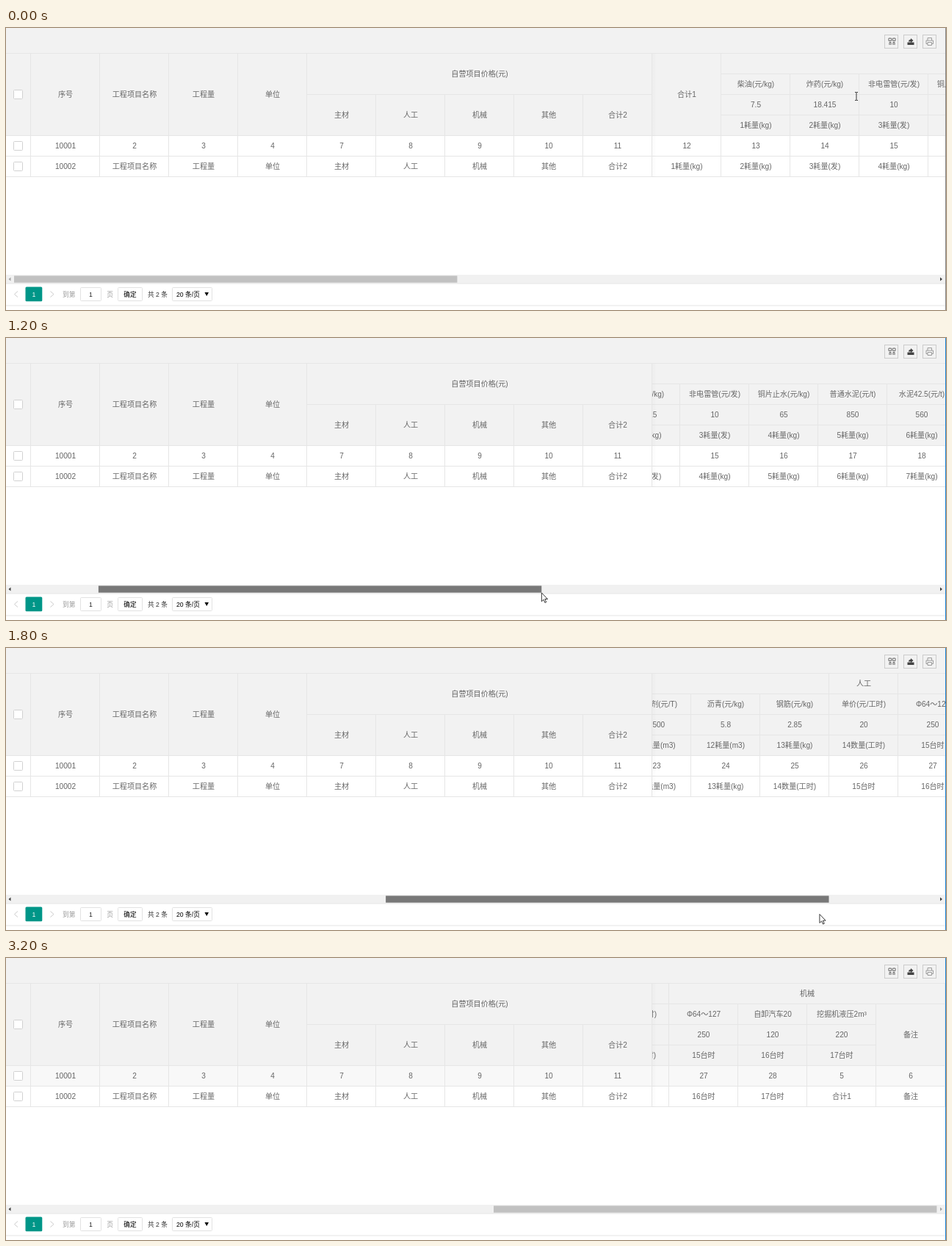
Animation, 1280 px wide and 384 px high, one loop 3500 ms. Source, as an HTML page:

```html
<!DOCTYPE html>
<html lang="zh-CN">
<head>
<meta charset="utf-8">
<style>
  html, body { margin: 0; width: 100%; height: 100%; overflow: hidden; background: #fff; }
  svg { display: block; width: 1280px; height: 384px; }
  text { font-family: "Liberation Sans", "Noto Sans CJK SC", "Noto Sans CJK", sans-serif; }
</style>
</head>
<body>
<svg id="stage" viewBox="0 0 1280 384">
  <defs>
    <clipPath id="view"><rect x="880" y="34" width="399" height="170"/></clipPath>
    <linearGradient id="shade">
      <stop offset="0" stop-opacity=".02"/>
      <stop offset="1" stop-opacity="0"/>
    </linearGradient>
  </defs>
</svg>
<script>
const LOOP = 3500, STEP = 100;
const PRESS = 700, RELEASE = 2500;
const COL = 94, ROW = 28, HEAD_TOP = 35, FIXED = 880;
const MAX_SCROLL = 1387, SCROLL_RATIO = 2.124, THUMB_LEFT = 11;
const LINE = '#e6e6e6', GREY = '#f2f2f2', INK = '#666';

const stage = document.getElementById('stage');
const rowY = r => HEAD_TOP + r * ROW;   // 0-3 header, 4-5 body
const colX = i => FIXED + i * COL;

function add(parent, tag, attrs, content) {
  const node = document.createElementNS('http://www.w3.org/2000/svg', tag);
  for (const key in attrs) node.setAttribute(key, attrs[key]);
  if (content !== undefined) node.textContent = content;
  parent.appendChild(node);
  return node;
}
const box = (parent, x, y, width, height, fill, more) =>
  add(parent, 'rect', { x, y, width, height, fill, ...more });
const frame = (x, y, w, h, stroke) =>
  box(stage, x + .5, y + .5, w - 1, h - 1, '#fff', { stroke, rx: 1 });
const path = (d, stroke, more) =>
  add(stage, 'path', { d, stroke, fill: 'none', ...more });
const label = (parent, x, y, content, fill = INK, size = 10.1, anchor = 'middle') =>
  add(parent, 'text', { x, y: y + size * .37, fill, 'font-size': size, 'text-anchor': anchor }, content);

// Cell over the rows from..to with a right and a bottom border
function cell(parent, x, from, to, w, content = '') {
  const top = rowY(from), bottom = rowY(to);
  box(parent, x + w - 1, top, 1, bottom - top, LINE);
  box(parent, x, bottom - 1, w, 1, LINE);
  if (content !== '') label(parent, x + w / 2, (top + bottom) / 2 - .5, content);
}
function bodyCells(parent, x, w, first, second) {
  cell(parent, x, 4, 5, w, first);
  cell(parent, x, 5, 6, w, second);
}

// Backgrounds
box(stage, 0, 0, 1280, 384, '#fff');
box(stage, 0, 0, 1280, rowY(4), GREY);
box(stage, 0, HEAD_TOP - 1, 1280, 1, LINE);
const hoverRow = box(stage, 0, rowY(4), 1280, ROW - 1, '#f8f8f8');

// Scrolling columns
const names = ('合计1,柴油(元/kg),炸药(元/kg),非电雷管(元/发),铜片止水(元/kg),普通水泥(元/t),水泥42.5(元/t),' +
  '粉煤灰(元/kg),砂(元/m3),石(元/m3),块石(元/m3),减水剂(元/T),沥青(元/kg),钢筋(元/kg),单价(元/工时),' +
  'Φ64～127,自卸汽车20,挖掘机液压2m³,备注').split(',');
const prices = ',7.5,18.415,10,65,850,560,0.48,66,50,60,2500,5.8,2.85,20,250,120,220'.split(',');

function usage(i) {
  if (i === 18) return '合计1';
  if (i > 14) return i + '台时';
  if (i === 14) return i + '数量(工时)';
  return `${i}耗量(${i === 3 ? '发' : i > 7 && i < 13 ? 'm3' : 'kg'})`;
}

const view = add(stage, 'g', { 'clip-path': 'url(#view)' });
const table = add(view, 'g', {});
const last = names.length - 1;
names.forEach((name, i) => {
  const x = colX(i);
  if (i === 0) cell(table, x, 0, 4, COL, name);
  else if (i === last) cell(table, x, 1, 4, COL, name);
  else [name, prices[i], usage(i)].forEach((v, r) => cell(table, x, r + 1, r + 2, COL, v));
  bodyCells(table, x, COL, i < 17 ? 12 + i : i - 12, i === last ? name : usage(i + 1));
});
cell(table, colX(1), 0, 1, 13 * COL, '主材价格及参考消耗量');
cell(table, colX(14), 0, 1, COL, '人工');
cell(table, colX(15), 0, 1, 4 * COL, '机械');
box(view, FIXED, HEAD_TOP, 6, 6 * ROW, 'url(#shade)');

// Fixed columns
cell(stage, 0, 0, 4, 34);
bodyCells(stage, 0, 34);
[84, 154, 182].forEach(y => frame(10, y, 13, 13, '#d2d2d2'));
['序号', '工程项目名称', '工程量', '单位', '主材', '人工', '机械', '其他', '合计2'].forEach((name, i) => {
  const x = 34 + i * COL;
  cell(stage, x, i < 4 ? 0 : 2, 4, COL, name);
  bodyCells(stage, x, COL, i ? i + (i < 4 ? 1 : 3) : 10001, i ? name : 10002);
});
cell(stage, 410, 0, 2, 5 * COL, '自营项目价格(元)');

// Toolbar
for (let x = 1196.5; x < 1260; x += 26) box(stage, x, 9.5, 18, 18, 'none', { stroke: '#ccc' });
path('M1202 14h3.5v3.5h-3.5zM1207.5 14h3.5v3.5h-3.5zM1203 23v-3.5h2v3.5M1208 23v-3.5h2v3.5', '#666');
path('M1227.5 19.500h9v3.500h-9zM1229 18.500q0-2.500 3-3v-1.500l3.500 3-3.500 3v-1.500z', 'none', { fill: '#444' });
path('M1255 17v-3.500h5.500v3.500M1255 21.500h-2v-4.500h9.500v4.500h-2M1255 19.500h5.500v4h-5.500z', '#888', { 'stroke-width': .8 });

// Scrollbar
box(stage, 0, 336, 1279, 12, '#f1f1f1');
const thumb = box(stage, THUMB_LEFT, 337.4, 603.4, 9.3, '#c1c1c1');
const leftArrow = path('M6.5 339.5v5l-3-2.5z', 'none');
const rightArrow = path('M1272 339.5v5l3-2.5z', 'none');

// Pager
box(stage, 0, 347.5, 1279, 1, LINE);
box(stage, 0, 377.5, 1279, 1, LINE);
path('M16 358.5l-4.5 4 4.5 4M60.5 358.5l4.5 4-4.5 4', '#ccc');
box(stage, 26.5, 352.6, 22.8, 19.6, '#009688', { rx: 1.5 });
[[101, 29], [152, 34], [226, 55]].forEach(([x, w]) => frame(x, 353, w, 19, '#e2e2e2'));
const small = (x, s, fill, anchor) => label(stage, x, 362.5, s, fill, 8.7, anchor);
small(38, '1', '#fff');
small(77, '到第', '#999', 'start');
small(115.5, '1', '#222');
small(141.5, '页', '#999');
small(169, '确定', '#000');
small(206.5, '共 2 条', '#333');
small(232, '20 条/页', '#000', 'start');
path('M270.5 360h5.5l-2.75 5z', 'none', { fill: '#000' });

const windowEdge = box(stage, 1279, 0, 1, 384, '#8a8a8a');

// Pointers
const arrow = path('M.5 .5V12.4L3.2 9.9 5.1 14 6.9 13.2 5 9.1H8.7Z', '#222', { fill: '#fff', 'stroke-width': .9 });
const beam = path('M-2-5.5h1.5l.5.5.5-.5h1.5M0-5v10M-2 5.500h1.500l.5-.5.5.5h1.500', '#333');

// Key points: time, then values
const scrollKeys = [
  [PRESS, 0], [800, 17], [900, 78], [1200, 244], [1400, 509], [1600, 918],
  [1800, 1075], [2200, 1336], [2250, MAX_SCROLL]
];
const leaveKeys = [[2400, 1242, 362], [2600, 1232, 325], [2700, 1213, 256], [2900, 922, 206], [3100, 1200, 93]];

function sample(keys, t, field = 1) {
  const next = keys.findIndex(k => k[0] > t);
  if (next < 0) return keys[keys.length - 1][field];
  if (next === 0) return keys[0][field];
  const a = keys[next - 1], b = keys[next];
  return a[field] + (b[field] - a[field]) * (t - a[0]) / (b[0] - a[0]);
}

function pointerAt(t) {
  if (t < PRESS) {
    const u = 1 - Math.pow(1 - Math.min(t / 500, 1), 1.85);
    return [1158 - 569 * u, 93 + 245 * (1 - Math.pow(1 - u, 1.34))];
  }
  if (t < RELEASE) {
    // The hand runs slightly ahead of the thumb it drags
    const moved = sample(scrollKeys, t + 40) / SCROLL_RATIO;
    return [589 + moved, Math.min(362, 339 + moved * .053)];
  }
  return [sample(leaveKeys, t, 1), sample(leaveKeys, t, 2)];
}

function place(node, [x, y], visible) {
  node.setAttribute('transform', `translate(${x} ${y})`);
  show(node, visible);
}
const show = (node, visible) => node.setAttribute('visibility', visible ? 'visible' : 'hidden');
const paint = (node, fill) => node.setAttribute('fill', fill);

function render(time) {
  const t = Math.floor(time % LOOP / STEP) * STEP;
  const scroll = Math.round(sample(scrollKeys, t));
  const pointer = pointerAt(t);
  const dragging = t >= PRESS && t < RELEASE;
  const overBar = t >= 500 && t < PRESS;
  const overText = t < 100 || t >= 3100;

  table.setAttribute('transform', `translate(${-scroll} 0)`);
  thumb.setAttribute('x', THUMB_LEFT + scroll / SCROLL_RATIO);
  paint(thumb, dragging ? '#787878' : overBar ? '#a8a8a8' : '#c1c1c1');
  paint(leftArrow, scroll > 0 ? '#404040' : '#a3a3a3');
  paint(rightArrow, scroll < MAX_SCROLL ? '#404040' : '#a3a3a3');
  paint(windowEdge, t < PRESS ? '#8a8a8a' : '#1883d7');
  show(hoverRow, t >= 3000);
  place(arrow, pointer, !overText);
  place(beam, pointer, overText && t < 3200);
}

const start = performance.now();
function tick() {
  render(performance.now() - start);
  requestAnimationFrame(tick);
}
tick();
</script>
</body>
</html>
```
